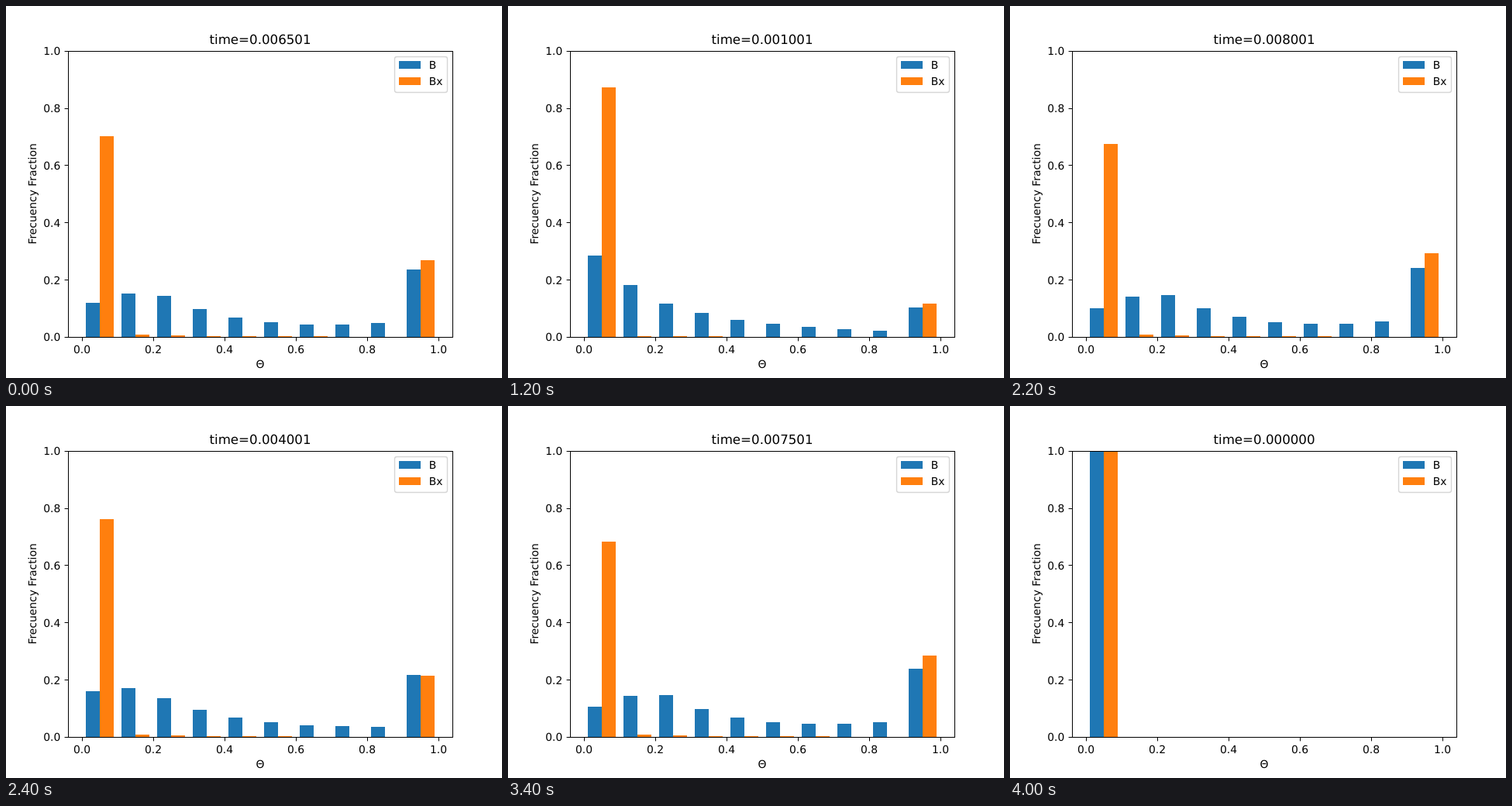
Write an HTML page with a canvas that moves like this. It is 640 px wide and 480 px high and loops after 4.2 s.

```html
<!DOCTYPE html>
<html>
<head>
<meta charset="utf-8">
<style>
  html, body { margin: 0; width: 100%; height: 100%; overflow: hidden; background: #fff; }
  canvas { display: block; }
</style>
</head>
<body>
<canvas id="chart" width="640" height="480"></canvas>
<script>
const ctx = document.getElementById('chart').getContext('2d');
const BLUE = '#1f77b4', ORANGE = '#ff7f0e';
const LEFT = 80, RIGHT = 576, TOP = 58, BASE = 427;
const SLOT = 200, FULL = 369;

// Simulation step shown in each slot; one step is 0.0005 time units.
const order = [13, 1, 20, 14, 5, 17, 2, 12, 4, 10, 11, 16, 8, 3, 9, 18, 19, 15, 6, 7, 0];

// Height in px of the B bar in bin i: the low bins drain, the top bin fills up.
function heightB(i, step) {
  const start = Math.exp(-1.3 * step);
  let h;
  if (i === 0) return 96 * Math.exp(-0.06 * step) + (FULL - 96) * start;
  if (i === 1) h = 76 * Math.exp(-0.0236 * step);
  else if (i === 9) return 90 * (1 - Math.exp(-0.27 * step));
  else {
    const slope = 0.08 + 0.065 * (i - 4.6) ** 2;
    h = 7 + 63 * 0.65 ** (i - 1) + slope * (step - 4);
  }
  return h * (1 - start);
}

// Height in px of the Bx bar: almost everything moves from the first bin to the last.
function heightBx(i, step) {
  const moved = 34.6 * step ** 0.45;
  if (i === 0) return FULL - moved;
  if (i === 9) return 0.9 * moved;
  const second = Math.min(3, step / 3);
  if (i === 1) return second;
  if (i === 2 && second > 2) return 2;
  return step && i <= Math.min(6, Math.round(2 + step / 3)) ? 1 : 0;
}

function text(str, x, y, align = 'center', size = 13.89) {
  ctx.font = size + 'px "DejaVu Sans", sans-serif';
  ctx.textRendering = 'geometricPrecision';
  ctx.textAlign = align;
  ctx.fillStyle = '#000';
  ctx.fillText(str, x, y);
}

function line(x1, y1, x2, y2) {
  ctx.beginPath();
  ctx.moveTo(x1, y1);
  ctx.lineTo(x2, y2);
  ctx.stroke();
}

function rect(color, x, y, w, h) {
  ctx.fillStyle = color;
  ctx.fillRect(x, y, w, h);
}

function bar(color, x, height) {
  const h = Math.round(height);
  rect(color, x, BASE - h, 18, h);
}

function drawBars(step) {
  for (let i = 0; i < 10; i++) {
    const x = 103 + 46 * i;
    bar(BLUE, x, heightB(i, step));
    bar(ORANGE, x + 18, heightBx(i, step));
  }
}

function drawAxes() {
  ctx.strokeStyle = '#000';
  ctx.lineWidth = 1;
  for (let k = 0; k <= 5; k++) {
    const label = (k / 5).toFixed(1);
    const x = 98 + 92 * k, y = 427.2 - 73.92 * k;
    const row = Math.round(y) + 0.5;
    line(x + 0.5, BASE + 0.5, x + 0.5, BASE + 5.4);
    line(LEFT + 0.5, row, LEFT - 4.4, row);
    text(label, x, 448);
    text(label, 70.3, Math.round(y + 5.28), 'right');
  }
  ctx.strokeRect(LEFT + 0.5, TOP + 0.5, RIGHT - LEFT, BASE - TOP);
  text('Θ', 328, 467);
  ctx.save();
  ctx.translate(39, 242.4);
  ctx.rotate(-Math.PI / 2);
  text('Frecuency Fraction', 0, 0);
  ctx.restore();
}

function drawLegend() {
  ctx.beginPath();
  ctx.roundRect(501.5, 65.5, 68, 46, 2.8);
  ctx.fillStyle = 'rgba(255,255,255,0.8)';
  ctx.fill();
  ctx.strokeStyle = '#d6d6d6';
  ctx.lineWidth = 1.39;
  ctx.stroke();
  rect(BLUE, 507, 71, 28, 10);
  rect(ORANGE, 507, 92, 28, 10);
  text('B', 545.8, 81, 'left');
  text('Bx', 545.8, 102, 'left');
}

function draw(now) {
  const step = order[Math.floor(now / SLOT) % order.length];
  const time = step ? step * 0.0005 + 1e-6 : 0;
  rect('#fff', 0, 0, 640, 480);
  drawBars(step);
  drawAxes();
  drawLegend();
  text('time=' + time.toFixed(6), 328, 49, 'center', 16.67);
}

let start;
function tick(now) {
  start ??= now;
  draw(Math.max(0, now - start));
  requestAnimationFrame(tick);
}
draw(0);
requestAnimationFrame(tick);
</script>
</body>
</html>
```
